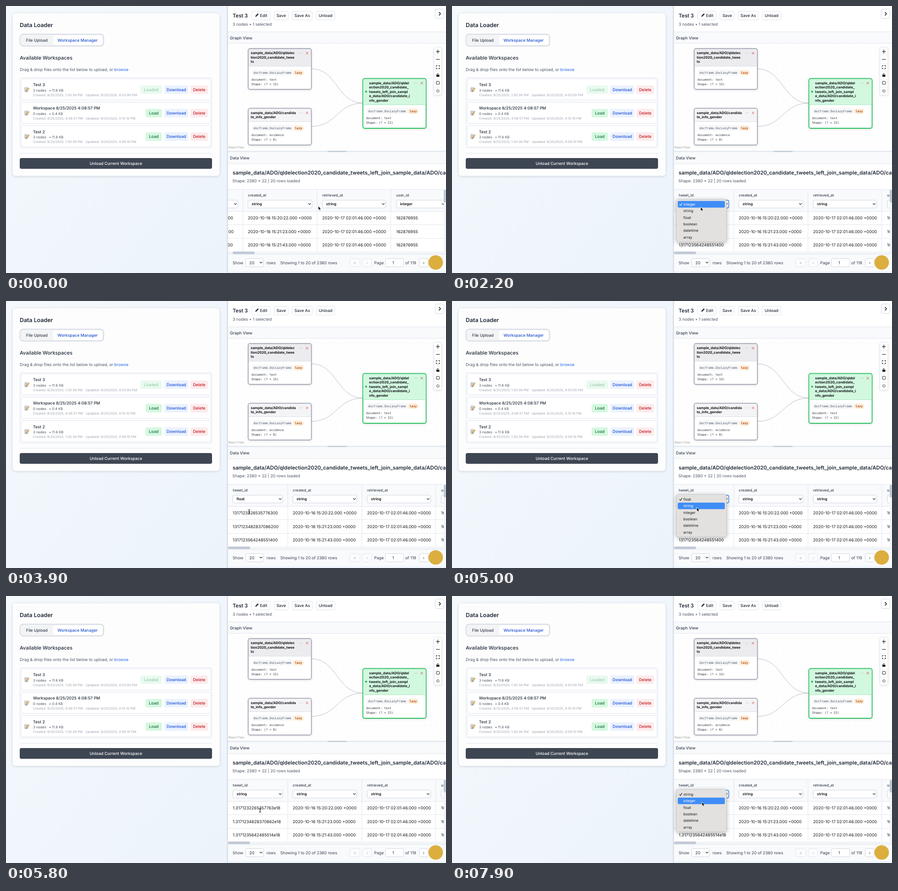
These frames come from a looping animation (961x583 px, 8 s). An HTML page:

```html
<!DOCTYPE html>
<html lang="en">
<head>
<meta charset="utf-8">
<title>Data Loader</title>
<style>
html, body { margin: 0; width: 100%; height: 100%; overflow: hidden; background: #f2f7fc; }
svg { display: block; font-family: Inter, sans-serif; text-rendering: geometricPrecision; }
.mono { font-family: "DejaVu Sans Mono", monospace; }
.shade { filter: drop-shadow(0 1px 2px rgba(0, 0, 0, .14)); }
.lift { filter: drop-shadow(0 2px 5px rgba(0, 0, 0, .3)); }
</style>
</head>
<body>
<svg id="stage" width="961" height="583" viewBox="0 0 961 583">
  <defs>
    <linearGradient id="sky" x2="1" y2="1"><stop stop-color="#f4f9fc"/><stop offset="1" stop-color="#ecf3fb"/></linearGradient>
    <pattern id="dots" x="489" y="86" width="12" height="12" patternUnits="userSpaceOnUse"><circle cx="6" cy="6" r=".5" fill="#d9dadd"/></pattern>
    <clipPath id="tableClip"><rect x="485" y="400" width="471" height="136"/></clipPath>
  </defs>
  <g id="page"></g>
  <g id="table" clip-path="url(#tableClip)"></g>
  <g id="top"></g>
</svg>
<script>
const $ = id => document.getElementById(id);
const INK = '#1f2937', GRAY = '#4b5563', LINE = '#e2e6ed', EDGE = '#cfd5de', SOFT = '#dfe3e9';

const rect = (x, y, w, h, r = 0, fill = '#fff', stroke = 'none', sw = 1, extra = '') =>
  `<rect x="${x}" y="${y}" width="${w}" height="${h}" rx="${r}" fill="${fill}" stroke="${stroke}" stroke-width="${sw}" ${extra}/>`;
const text = (x, y, s, size = 8.86, weight = 400, fill = INK, extra = '') =>
  `<text x="${x}" y="${y}" font-size="${size}" font-weight="${weight}" fill="${fill}" ${extra}>${s}</text>`;
const mid = (x, y, s, size, weight, fill) => text(x, y, s, size, weight, fill, 'text-anchor="middle"');
const mono = (x, y, s, fill = '#30343c', weight = 400) => text(x, y, s, 6.55, weight, fill, 'class="mono"');
const path = (d, stroke = INK, sw = 1, fill = 'none') =>
  `<path d="${d}" stroke="${stroke}" stroke-width="${sw}" fill="${fill}" stroke-linecap="round" stroke-linejoin="round"/>`;
const disc = (x, y, r, fill) => `<circle cx="${x}" cy="${y}" r="${r}" fill="${fill}"/>`;
const hline = (x, y, w, fill = LINE) => rect(x, y, w, 1, 0, fill);
const chevron = (x, y, color = '#222') => path(`M${x - 2.5} ${y - 1.2}l2.5 2.5 2.5-2.5`, color, 1.1);

function button(x, y, w, h, label, fill = '#fff', color = INK, stroke = 'none', dx = 0) {
  return rect(x, y, w, h, 3, fill, stroke) + mid(x + w / 2 + dx, y + h / 2 + 3.2, label, 8.86, 500, color);
}

function workspace(y, name, count, size, created, updated, loaded) {
  const icon = rect(40.5, y + 19, 8, 10, 1, '#e6e9ea', '#b4b9bd', .7) +
    path(`M42 ${y + 21.3}h5M42 ${y + 23.3}h4M42 ${y + 25.3}h3M42 ${y + 27.3}h2`, '#7d8794', .7) +
    path(`M45 ${y + 27}l5-6`, '#e39a2d', 2) + path(`M44.3 ${y + 28}l.4-.5`, '#333', 1.2);
  const load = loaded ? button(293.5, y + 15, 47, 18.5, 'Loaded', '#e9faef', '#9ccdae')
    : button(305, y + 15, 35.5, 18.5, 'Load', '#d5f8e0', '#15703a');
  return rect(33.5, y + .5, 414, 46, 3, '#fff', LINE) + icon +
    text(59, y + 16.5, name, 8.86, 500) +
    text(59, y + 28.2, count + ' nodes', 7.6, 400, GRAY) + text(94, y + 28.2, '• ' + size + ' KB', 7.6, 400, GRAY) +
    text(59, y + 38, `Created: 8/25/2025, ${created} PM`, 7.15, 400, '#9ca3af') +
    text(174, y + 38, `Updated: 8/25/2025, ${updated} PM`, 7.15, 400, '#9ca3af') +
    load + button(346, y + 15, 52, 18.5, 'Download', '#eaf2ff', '#1d4ed8') +
    button(403, y + 15, 38, 18.5, 'Delete', '#fdebec', '#c01c24');
}

function node(x, y, h, head, title, kind, shape, colors, indent = 0) {
  const [border, tint, sw] = colors, b = y + head;
  return rect(x, y, 138, h, 4, '#fff', border, sw, 'class="shade"') +
    path(`M${x + 1} ${b}v${3 - head}q0-2 2-2h132q2 0 2 2v${head - 3}z`, 'none', 0, tint) +
    hline(x + 1, b - .5, 136, indent ? '#a5e9bd' : '#dcdee3') +
    title.map((s, i) => text(x + 5.5 + indent, y + 12.3 + i * 9.5, s, 7.55, 700, '#16181d')).join('') +
    [0, 2.5, 5].map(d => disc(x + 113 + d, y + 10, .55, '#8b919c')).join('') +
    path(`M${x + 126.3} ${y + 7.8}l4.4 4.4m0-4.4l-4.4 4.4`, '#e0473f', 1) +
    rect(x + 8, b + 7.5, 90, 13, 3, '#f6f7f9') + mono(x + 11.5, b + 16.8, 'docframe.DocLazyFrame', '#4b5563') +
    rect(x + 98.5, b + 8.5, 22.5, 11.5, 5, '#fdebd5') + mono(x + 102, b + 16.6, 'lazy', '#b0501c', 700) +
    mono(x + 7, b + 31, 'document: ' + kind) + mono(x + 7, b + 41.6, `Shape: (? × ${shape})`);
}

function leftPanel() {
  return rect(0, 0, 483, 583, 0, 'url(#sky)') +
    rect(14.5, 15.5, 452, 355.5, 6, '#fdfdfe', '#edf0f4', 1, 'class="shade"') +
    text(30, 46, 'Data Loader', 12.4, 600) +
    rect(30.5, 61.5, 183, 26, 7, '#f3f4f6', '#cdd2da', 1.4) + rect(102, 63.5, 109.5, 22, 5, '#fff', '#e8eaee', .7) +
    text(43.7, 77.8, 'File Upload', 8.86, 500, '#374151') + text(112.5, 77.8, 'Workspace Manager', 8.86, 500, '#1d4fd0') +
    text(30, 117, 'Available Workspaces', 10.95, 500) +
    text(30, 142.3, 'Drag &amp; drop files onto the list below to upload, or <tspan fill="#2563eb">browse</tspan>', 8.86, 400, GRAY) +
    rect(30.5, 156.5, 419, 153.5, 3, '#fbfcfe', LINE) +
    workspace(158.5, 'Test 3', 3, '11.6', '1:30:38', '4:03:00', true) +
    workspace(209.7, 'Workspace 8/25/2025 4:08:57 PM', 0, '0.4', '4:08:57', '4:15:10') +
    workspace(261, 'Test 2', 3, '11.8', '1:30:38', '4:08:10') +
    hline(30, 321, 420) + rect(30, 332, 420, 23.5, 4, '#3d4652') +
    mid(240, 347.2, 'Unload Current Workspace', 8.86, 500, '#fff');
}

function controls() {
  let s = rect(935, 91, 16.5, 103, 2, '#fff', '#eceef1', 1, 'class="shade"');
  for (let i = 1; i < 6; i++) s += hline(935, 91 + i * 17.2, 16.5, '#eee');
  return s + path('M939.5 99.5h7.5m-3.75-3.75v7.5M939.5 116.5h7.5', '#111', 1.2) +
    path('M939.7 132v-2h2m3 0h2v2m0 3v2h-2m-3 0h-2v-2', '#111', 1.1) +
    rect(940, 150, 6.5, 4.5, .7, '#111') + path('M941.5 150v-1.2a1.7 1.7 0 0 1 3.3-.4', '#111') +
    rect(940, 164.5, 6.5, 6.5, 1, 'none', '#222') +
    path('M940.3 185.5a3 3 0 1 0 6 0a3 3 0 1 0-6 0m.9-2.1l4.2 4.2', '#444', .8);
}

function rightPanel() {
  return rect(483, 0, 478, 583) + rect(482, 0, 3, 583, 0, '#dde2ea') +
    text(495, 25, 'Test 3', 11.2, 600) + text(495, 43.3, '3 nodes • 1 selected', 8.86, 400, GRAY) +
    button(536.5, 11.5, 40.5, 19, 'Edit', '#fff', INK, SOFT, 6) + path('M545 23l.5-2 4.5-4.5 1.5 1.5-4.5 4.5z', INK, .7, INK) +
    button(585.5, 11.5, 31, 19, 'Save', '#fff', INK, SOFT) + button(625, 11.5, 44, 19, 'Save As', '#fff', INK, SOFT) +
    button(677.5, 11.5, 41, 19, 'Unload', '#fff', INK, SOFT) +
    rect(937.5, 6.5, 19, 21, 4, '#fff', EDGE) + path('M946 13.8l3 3.2-3 3.2', '#111', 1.5) +
    rect(485, 57, 476, 24, 0, '#f8fafc') + hline(485, 56, 476) + hline(485, 81, 476) +
    text(489, 72.5, 'Graph View', 8.86, 500, '#374151') +
    rect(485, 82, 476, 234, 0, '#fefefe') + rect(485, 82, 476, 234, 0, 'url(#dots)') +
    path('M667 137C723 137 723 212 779 212M667 263C723 263 723 212 779 212', '#b5b6bb', .9) +
    node(529, 93, 89, 38.5, ['sample_data/ADO/qldelec', 'tion2020_candidate_twee', 'ts'], 'text', 15, ['#9395aa', '#ececef', 1.4]) +
    node(529, 223.5, 80, 29, ['sample_data/ADO/candida', 'te_info_gender'], 'evidence', 8, ['#9395aa', '#f4f4f6', 1.4]) +
    node(779.5, 158.5, 108.5, 57, ['sample_data/ADO/qldel', 'ection2020_candidate_', 'tweets_left_join_sampl', 'e_data/ADO/candidate_i', 'nfo_gender'], 'text', 22, ['#25c05c', '#d2f8df', 1.8], 8) +
    disc(786.5, 187, 2, '#1fa850') + controls() +
    text(486, 311, 'React Flow', 6.6, 400, '#999') +
    rect(485, 316, 476, 3, 0, '#e6eaf1') + rect(702, 316.5, 42, 2, 1, '#b9c4d4') +
    rect(485, 319, 476, 25, 0, '#f8fafc') + hline(485, 344, 476) +
    text(489, 335, 'Data View', 8.86, 500, '#374151') +
    text(495, 368, 'sample_data/ADO/qldelection2020_candidate_tweets_left_join_sample_data/ADO/candidate_info_gender', 11.39, 600) +
    text(494.5, 385, 'Shape: 2380 × 22 | 20 rows loaded', 8.86, 400, GRAY) + footer();
}

function footer() {
  return rect(485, 536, 476, 6, 0, '#f3f5f8') + rect(956, 400, 5, 136, 0, '#f3f5f8') + rect(956, 401, 5, 28, 2.5, '#c0c8d5') +
    rect(485, 542, 476, 37, 0, '#f9fafc') + hline(485, 542, 476) + rect(485, 579, 476, 4, 0, '#eff4fc') +
    text(495, 563.7, 'Show', 8.86, 400, '#374151') + rect(523.5, 551.5, 39, 18, 3, '#fff', EDGE) +
    text(531.5, 563.7, '20') + chevron(557, 560) + text(569, 563.7, 'rows', 8.86, 400, '#374151') +
    text(599, 563.7, 'Showing 1 to 20 of 2380 rows', 8.86, 400, '#374151') +
    button(750.5, 551.5, 22.5, 18, '«', '#fbfcfd', '#b6bcc6', LINE) + button(779, 551.5, 19.5, 18, '‹', '#fbfcfd', '#b6bcc6', LINE) +
    text(804, 563.7, 'Page', 8.86, 400, '#374151') + rect(828.5, 551.5, 40, 18, 3, '#fff', EDGE) + mid(845.5, 563.7, '1') +
    text(872, 563.7, 'of 119', 8.86, 400, '#374151') + button(902.5, 551.5, 19.5, 18, '›', '#fff', GRAY, EDGE);
}

// Keys are [time, ...values]; motion eases between neighbours.
function at(keys, t) {
  const i = keys.findIndex(k => k[0] > t);
  if (i < 0) return keys[keys.length - 1].slice(1);
  const a = keys[i - 1], b = keys[i], u = (t - a[0]) / (b[0] - a[0]), e = u * u * (3 - 2 * u);
  return a.slice(1).map((v, j) => v + (b[j + 1] - v) * e);
}

const SCROLL = [[0, 98], [500, 177], [850, 177], [1500, 0]];
const POINTER = [[0, 682, 437], [1300, 682, 437], [1850, 558, 431], [2000, 556, 431], [2200, 543, 439], [2500, 529, 463],
  [3800, 529, 463], [4300, 548, 432], [4650, 548, 432], [4950, 534.5, 451], [5250, 534.5, 451], [5750, 555, 468],
  [6700, 555, 468], [7200, 556, 432], [7450, 556, 432], [7800, 546, 450]];
const MENUS = [[2000, 2700, 'integer'], [4600, 5250, 'float'], [7400, 8000, 'string']];
const BUSY = [[2750, 3800], [5300, 5650]];
const TYPES = ['string', 'integer', 'float', 'boolean', 'datetime', 'array'];
const IDS = ['1317123226535776300', '1317123482837086200', '1317123564248551400'];
const TIMES = ['15:20:22', '15:21:23', '15:21:43'];

const scientific = id => `${id[0]}.${id.slice(1, 17)}e18`;
const during = (spans, t) => spans.find(([a, b]) => t >= a && t < b);

function spinner(x, y, r, t, sw, half) {
  const a = (125 + (t - 3400) * .36) * Math.PI / 180, p = d => `${x + r * Math.cos(a + d)} ${y + r * Math.sin(a + d)}`;
  return path(`M${p(-half)}A${r} ${r} 0 ${half > Math.PI / 2 ? 1 : 0} 1 ${p(half)}`, '#3b6fe8', sw);
}

function table(t, scroll) {
  const busy = during(BUSY, t), menu = during(MENUS, t);
  const type = t < 3800 ? 'integer' : t < 5650 ? 'float' : 'string';
  const columns = [
    [495, 110, 'tweet_id', type, IDS.map(t < 5650 ? String : scientific)],
    [626, 141, 'created_at', 'string', TIMES.map(s => `2020-10-16 ${s}.000 +0000`)],
    [788.5, 139.5, 'retrieved_at', 'string', TIMES.map(() => '2020-10-17 02:01:46.000 +0000')],
    [950, 109, 'user_id', 'integer', TIMES.map(() => '162876955')],
    [1080, 110, 'username', 'string', TIMES.map(() => 'OwenFairlock')]
  ];
  let s = rect(485, 400, 471, 136) + rect(485, 400, 471, 48, 0, '#f8fafc') +
    [400, 448, 477, 507].map(y => hline(485, y, 471)).join('');
  columns.forEach(([x0, w, name, kind, cells], i) => {
    const x = x0 - scroll, off = !i && busy;
    s += rect(x + w + 10, 400, 1, 136, 0, LINE) + text(x + .3, 416, name, 8, 500, '#374151') +
      rect(x + .5, 424, w - 1, 17, 3, off ? '#f6f7f9' : '#fff', !i && menu ? '#3b82f6' : EDGE, !i && menu ? 1.4 : 1) +
      text(x + 8.5, 435.4, kind, 8, 600, off ? '#8b919c' : '#111') + chevron(x + w - 6, 432.3, off ? '#8b919c' : '#222') +
      cells.map((c, j) => text(x + .3, 466.3 + j * 29.3, c, 9.05, 400, '#14171c')).join('');
    if (off) s += spinner(x + 90, 432.3, 3.4, t, 1.2, 2.3);
  });
  return s;
}

function popup(current, y) {
  const hover = Math.floor((y - 425.5) / 14.4);
  return rect(490, 422.5, 109.5, 92.5, 4.5, '#e3e1df', '#c4c3c3', .7, 'class="lift"') +
    [current, ...TYPES.filter(k => k !== current)].map((k, i) => {
      const top = 425.8 + i * 14.4, ink = i === hover ? '#fff' : '#1c1c1e';
      return (i === hover ? rect(493, top, 103, 14.4, 3, '#3f8df6') : '') + text(505.3, top + 10, k, 8, 400, ink) +
        (i ? '' : path(`M497 ${top + 7.5}l2 2.3 3.3-5`, ink, 1.1));
    }).join('');
}

function pointer(x, y, beam) {
  return beam
    ? path(`M${x - 2} ${y - 4.5}q2 0 2 1.5v6q0 1.5-2 1.5m4-9q-2 0-2 1.5v6q0 1.5 2 1.5`, '#222', .9)
    : path(`M${x} ${y}v8.6l2-1.8 1.5 3.3 1.5-.7-1.5-3.2h2.7z`, '#fff', .8, '#111');
}

function draw(t) {
  const [scroll] = at(SCROLL, t), [x, y] = at(POINTER, t);
  const menu = during(MENUS, t), busy = during(BUSY, t);
  $('table').innerHTML = table(t, scroll);
  $('top').innerHTML = rect(485 + scroll * .102, 536.3, 48, 5.2, 2.6, '#c0c8d5') +
    (menu ? popup(menu[2], y) : '') +
    (busy ? rect(0, 0, 961, 583, 0, 'rgba(0,0,0,.5)') : '') +
    disc(938.5, 560, 15.8, '#dcae3e') +
    (busy ? rect(341, 247, 115.5, 47, 4.5, '#fff', 'none', 0, 'class="lift"') + spinner(364.5, 270.5, 7.8, t, 1.3, .95) +
      text(380.3, 274.5, 'Processing...', 9.9, 400, '#374151') : '') +
    pointer(x, y, !menu && !busy && y > 450);
}

$('page').innerHTML = leftPanel() + rightPanel();
const start = performance.now();
(function tick() {
  draw((performance.now() - start) % 8000);
  requestAnimationFrame(tick);
})();
</script>
</body>
</html>
```
